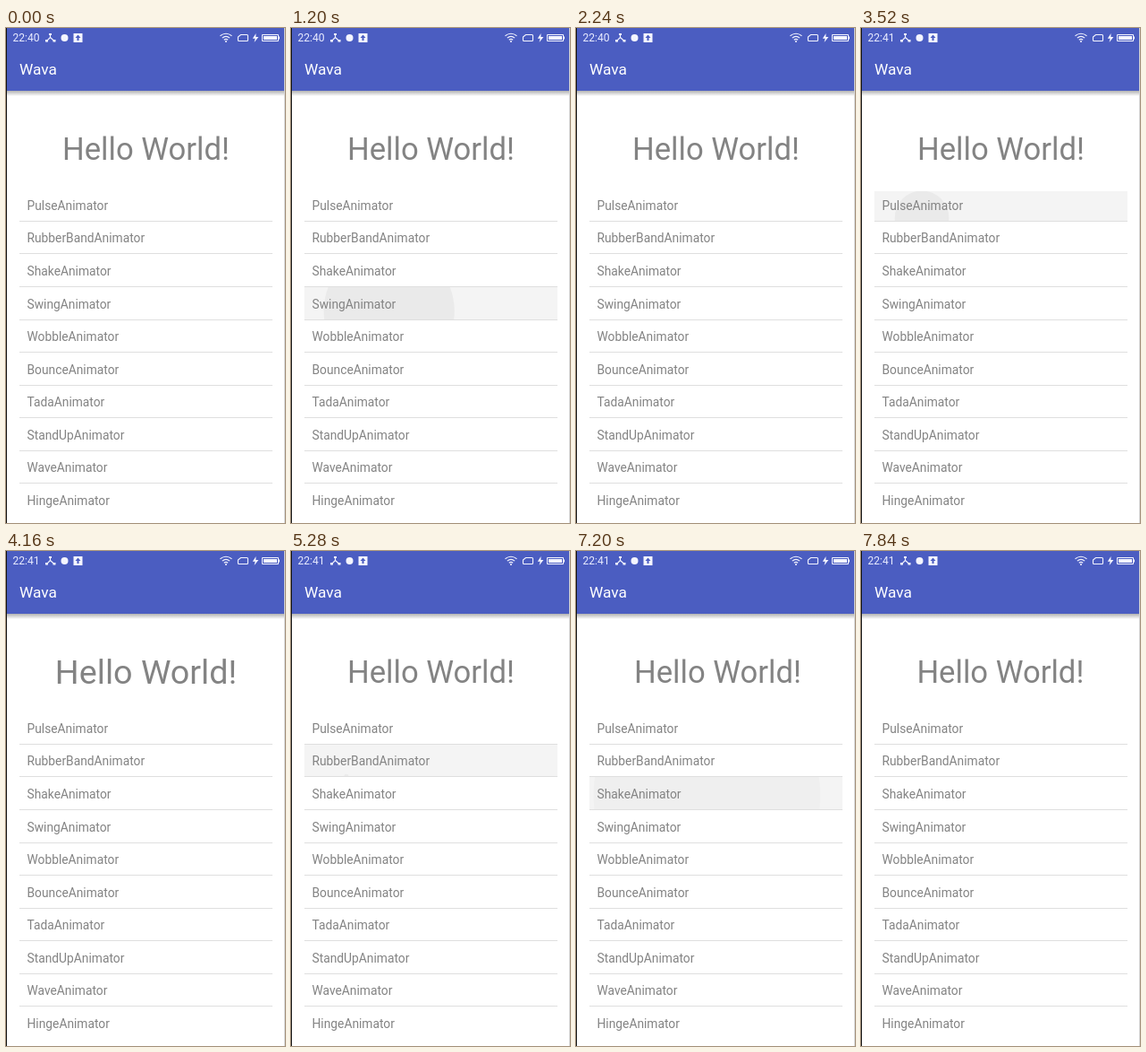
An HTML page with a canvas for the animation above (8000 ms loop, 312 by 552 pixels).

```html
<!DOCTYPE html>
<html lang="en">
<head>
<meta charset="utf-8">
<title>View animators</title>
<style>
  html, body { margin: 0; width: 100%; height: 100%; overflow: hidden; background: #fff; }
  canvas { display: block; }
</style>
</head>
<body>
<canvas id="stage" width="312" height="552"></canvas>
<script>
const ctx = document.getElementById('stage').getContext('2d');
const LOOP = 8000, STEP = 80;
const BLUE = '#4b5dc1', GREY = '#838383';
const ROW = 36.56, LIST_TOP = 182, FIRST_LINE = 215.4;
const rows = ['Pulse', 'RubberBand', 'Shake', 'Swing', 'Wobble',
              'Bounce', 'Tada', 'StandUp', 'Wave', 'Hinge'];

// Each tap: row, press time, animation start, touch point x and the headline's pose
const taps = [
  { row: 3, press: 1040, start: 1207, x: 60,
    pose: f => ({ angle: track([0, 10, -10, 6, -6, 3, -3, 0], f) }) },
  { row: 0, press: 3520, start: 3620, x: 44,
    pose: f => { const s = track([1, 1.1, 1], f); return { sx: s, sy: s }; } },
  { row: 1, press: 5280, start: 5440, x: 60,
    pose: f => ({ sx: track([1, 1.25, .75, 1.15, 1], f), sy: track([1, .75, 1.25, .85, 1], f) }) },
  { row: 2, press: 7040, start: 7090, x: 61,
    pose: f => ({ dx: track([0, 25, -25, 25, -25, 15, -15, 6, -6, 0], f) * .289 }) },
];

const clamp = v => Math.min(1, Math.max(0, v));
const ease = t => .5 - Math.cos(Math.PI * t) / 2;

function track(values, f) {
  const p = f * (values.length - 1);
  const i = Math.min(Math.floor(p), values.length - 2);
  return values[i] + (values[i + 1] - values[i]) * (p - i);
}

function rect(x, y, w, h, color) {
  ctx.fillStyle = color;
  ctx.fillRect(x, y, w, h);
}

function disc(x, y, r, color) {
  ctx.fillStyle = color;
  ctx.beginPath();
  ctx.arc(x, y, r, 0, 7);
  ctx.fill();
}

function text(str, x, y, size, color) {
  ctx.font = `${size}px Roboto, sans-serif`;
  ctx.fillStyle = color;
  ctx.fillText(str, x, y);
}

function shape(path, color, line = 0) {
  const p = new Path2D(path);
  ctx.fillStyle = ctx.strokeStyle = color;
  ctx.lineWidth = line;
  if (line) ctx.stroke(p); else ctx.fill(p);
}

function drawStatusBar(time) {
  text(time < 2640 ? '22:40' : '22:41', 7.5, 15, 12.1, '#e9ecff');
  const white = '#f4f5ff';
  shape('M49.5 6V10.5L45 15M49.5 10.5L54.5 15', white, 1.1);
  shape('M48 6h3v2h-3zM44 13h3v2.5h-3zM52.5 13h3v2.5h-3z', white);
  disc(65.5, 11, 4, white);
  rect(75.5, 6, 10, 10, white);
  shape('M80.5 7.5L83.5 11H81.5V14H79.5V11H77.5Z', BLUE);
  shape('M239.5 8.8Q246 3.8 252.5 8.8M241.8 11.1Q246 7.7 250.2 11.1M243.8 13.2Q246 11.6 248.2 13.2', white, 1.1);
  disc(246, 15, 1, white);
  shape('M262.5 7.5H269.5Q270.5 7.5 270.5 8.5V13.5Q270.5 14.5 269.5 14.5H260.5Q259.5 14.5 259.5 13.5V10Z', white, 1.1);
  shape('M279.5 6L275.8 11.7H278.6L277.6 16L282.4 9.9H279.4Z', white);
  shape('M286.5 7.5H304.5V14.5H286.5Z', white, 1);
  rect(288, 9, 15, 4, white);
  rect(305, 9.5, 1, 3, white);
}

function drawBar(time) {
  const shadow = ctx.createLinearGradient(0, 70, 0, 76);
  shadow.addColorStop(0, 'rgba(0,0,0,.3)');
  shadow.addColorStop(1, 'rgba(0,0,0,0)');
  rect(0, 70, 312, 6, shadow);
  rect(0, 0, 312, 70, BLUE);
  text('Wava', 15, 52, 17.3, '#fff');
  drawStatusBar(time);
}

// Row highlight plus a ripple that grows from the touch point towards the row's centre
function drawPress(tap, time) {
  const since = time - tap.start;
  if (time < tap.press || since > 400) return;
  const bottom = FIRST_LINE + tap.row * ROW;
  const top = Math.max(LIST_TOP, bottom - ROW);
  const radius = Math.min(142, Math.max(0, .46 * (since + 166)));
  const grown = radius / 142;
  ctx.save();
  ctx.beginPath();
  ctx.rect(15, Math.floor(top), 283, Math.floor(bottom) - Math.floor(top));
  ctx.clip();
  rect(15, top - 1, 283, 40, `rgba(0,0,0,${.043 * clamp((400 - since) / 290)})`);
  const y = bottom + ((top - bottom) / 2) * grown;
  disc(tap.x + (156.5 - tap.x) * grown, y, radius,
       `rgba(0,0,0,${.038 * clamp((250 - since) / 260)})`);
  ctx.restore();
}

function drawHeadline(time) {
  const tap = taps.find(t => time >= t.start && time < t.start + 1000);
  const { angle = 0, sx = 1, sy = 1, dx = 0 } =
    tap ? tap.pose(ease((time - tap.start) / 1000)) : {};
  ctx.save();
  ctx.translate(156.5 + dx, 134);
  ctx.rotate(angle * Math.PI / 180);
  ctx.scale(sx, sy);
  ctx.textAlign = 'center';
  text('Hello World!', 0, 12.5, 34.67, GREY);
  ctx.restore();
}

function draw(time) {
  rect(0, 0, 312, 552, '#fff');
  taps.forEach(tap => drawPress(tap, time));
  rows.forEach((name, i) => {
    const line = FIRST_LINE + i * ROW;
    if (i < rows.length - 1) rect(15, Math.floor(line), 283, 1, '#dfdfdf');
    text(name + 'Animator', 23.5, line - 12.5, 13.8, GREY);
  });
  drawHeadline(time);
  drawBar(time);
  rect(311, 0, 1, 552, '#d4d4d4');
  rect(0, 0, 1, 552, '#111');
}

const begin = performance.now();
function tick() {
  const time = (performance.now() - begin) % LOOP;
  draw(Math.floor(time / STEP) * STEP);
  requestAnimationFrame(tick);
}
tick();
</script>
</body>
</html>
```
